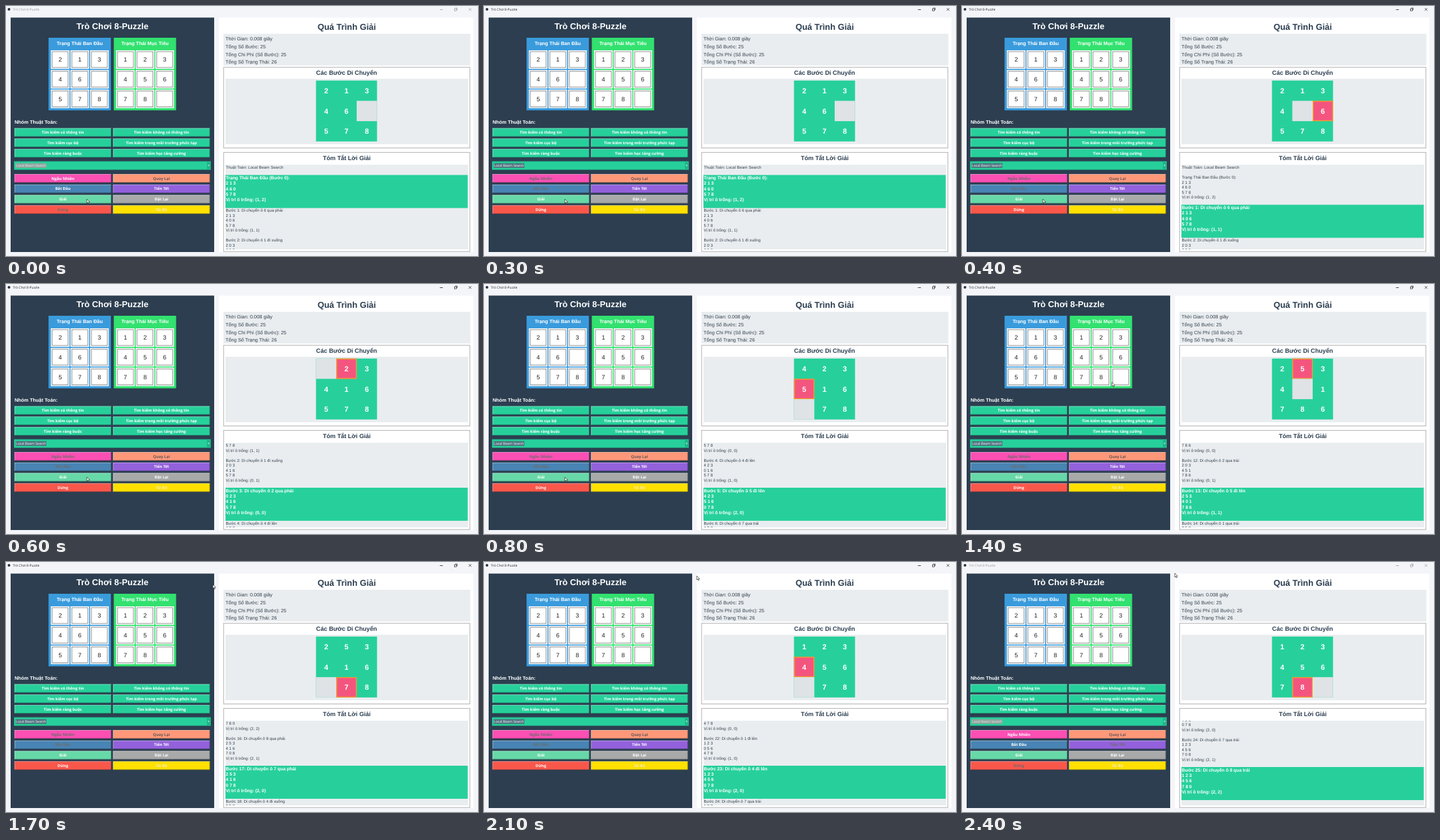
An HTML page with a canvas for the animation above (2.8 s loop, 712 by 378 pixels).

```html
<!DOCTYPE html>
<html lang="vi">
<head>
<meta charset="utf-8">
<title>Trò Chơi 8-Puzzle</title>
<style>
html, body { margin: 0; width: 712px; height: 378px; overflow: hidden; }
canvas { display: block; }
</style>
</head>
<body>
<canvas id="stage" width="712" height="378"></canvas>
<script>
const ctx = document.getElementById('stage').getContext('2d');
ctx.textRendering = 'geometricPrecision';
const ARIAL = '"Liberation Sans", Arial, sans-serif';
const UI = '"Open Sans", "Noto Sans", sans-serif';
const GREEN = '#27d09b', NAVY = '#2c3e50', GREY = '#e9edf0', OFF = '#6d6d6d';

const LOOP = 2800, TICK = 100;
const STEP_AT = [0, 0, 0, 0, 1, 2, 3, 4, 5, 6, 7, 9, 10, 11, 13, 14, 16, 17, 18, 20, 21, 23, 24, 25, 25];
const POINTER = [[0, 122, 292], [8, 122, 292], [12, 169, 225], [17, 312, 34], [21, 321, 21], [24, 321, 17]];

// Play the solution: each digit is the tile that slides into the gap.
const WAYS = { 1: 'qua phải', '-1': 'qua trái', 3: 'đi xuống', '-3': 'đi lên' };
const steps = [{ title: 'Trạng Thái Ban Đầu (Bước 0):', cells: [...'213460578'] }];
[...'6124578615425168741521478'].forEach((tile, i) => {
  const cells = [...steps[i].cells];
  const from = cells.indexOf(tile), to = cells.indexOf('0');
  cells[to] = tile;
  cells[from] = '0';
  steps.push({ title: `Bước ${i + 1}: Di chuyển ô ${tile} ${WAYS[to - from]}`, cells, moved: to });
});

function rect(x, y, w, h, fill) {
  ctx.fillStyle = fill;
  ctx.fillRect(x, y, w, h);
}

function frame(x, y, w, h, color, line = 1) {
  ctx.strokeStyle = color;
  ctx.lineWidth = line;
  ctx.strokeRect(x, y, w, h);
}

// y is the middle of the capital letters
function text(str, x, y, size, color, { bold = false, align = 'left', font = ARIAL } = {}) {
  ctx.font = `${bold ? 'bold ' : ''}${size}px ${font}`;
  ctx.textAlign = align;
  ctx.fillStyle = color;
  ctx.fillText(str, x, y + size * 0.36);
}

const heading = (str, x, y, size, color) => text(str, x, y, size, color, { bold: true, align: 'center' });

function path(points, close) {
  ctx.beginPath();
  points.forEach(([x, y]) => ctx.lineTo(x, y));
  if (close) ctx.closePath();
}

function titleBar(active) {
  const ink = active ? '#222' : '#999';
  ctx.fillStyle = '#26323f';
  ctx.beginPath();
  ctx.arc(4.5, 5, 2, 0, 7);
  ctx.fill();
  text('Trò Chơi 8-Puzzle', 10.5, 5.3, 5, ink, { font: UI });
  rect(654.5, 5, 4.5, 0.8, ink);
  frame(676.4, 4.2, 3, 3, ink, 0.7);
  ctx.lineWidth = 0.7;
  path([[677.4, 3], [680.6, 3], [680.6, 6.2]]);
  ctx.stroke();
  for (const d of [-2, 2]) {
    path([[700 - d, 3.2], [700 + d, 7.2]]);
    ctx.stroke();
  }
}

function smallBoard(x, color, title, cells) {
  rect(x, 48, 94, 109.7, color);
  heading(title, x + 47, 56, 7.4, '#fff');
  [...cells].forEach((n, i) => {
    const cx = x + 17.5 + i % 3 * 29.6, cy = 81 + Math.floor(i / 3) * 29.7;
    rect(cx - 14, cy - 14, 28, 28, '#fff');
    frame(cx - 12, cy - 12, 24, 24, '#777', 0.8);
    if (n !== '0') text(n, cx, cy, 9.2, '#222', { align: 'center' });
  });
}

function button(label, i, top, color, ink = '#fff') {
  const x = i % 2 ? 161.5 : 12.8, y = top + Math.floor(i / 2) * 15.75;
  rect(x, y, 146, 12.7, color);
  rect(x, y, 146, 0.7, '#ffffff80');
  rect(x, y, 0.7, 12.7, '#ffffff80');
  rect(x, y + 12, 146, 0.7, '#00000050');
  rect(x + 145.3, y, 0.7, 12.7, '#00000050');
  text(label, x + 73, y + 6.4, 5.85, ink, { bold: true, align: 'center', font: UI });
}

function leftPanel(active, ended) {
  rect(7, 17.5, 307, 354.5, NAVY);
  heading('Trò Chơi 8-Puzzle', 160.5, 30.5, 12.9, '#fff');
  smallBoard(64.2, '#3a9bdc', 'Trạng Thái Ban Đầu', '213460578');
  smallBoard(162.6, '#32e16f', 'Trạng Thái Mục Tiêu', '123456780');

  text('Nhóm Thuật Toán:', 13, 175, 7.4, '#fff', { bold: true });
  ['Tìm kiếm có thông tin', 'Tìm kiếm không có thông tin', 'Tìm kiếm cục bộ',
    'Tìm kiếm trong môi trường phức tạp', 'Tìm kiếm ràng buộc', 'Tìm kiếm học tăng cường']
    .forEach((label, i) => button(label, i, 184.7, GREEN));

  rect(12, 234.8, 297, 12.7, GREEN);
  frame(12.3, 235.1, 296.4, 12.1, '#1fa97e', 0.6);
  rect(14.5, 237.6, 46.5, 7.2, active ? '#4f7480' : '#8ba79f');
  text('Local Beam Search', 15, 241.2, 5.2, active ? '#fff' : '#f3e3e3', { font: UI });
  rect(303, 235.8, 5.2, 10.8, '#1fb588');
  ctx.fillStyle = '#fff';
  path([[304.2, 240.4], [307, 240.4], [305.6, 242]], true);
  ctx.fill();

  const whileIdle = active ? OFF : '#fff';
  [['Ngẫu Nhiên', '#fb4fb4', whileIdle], ['Quay Lại', '#ff9878', '#66595a'],
    ['Bắt Đầu', '#4884b4', whileIdle], ['Tiến Tới', '#9361dc', ended ? OFF : '#fff'],
    ['Giải', '#67d8a7'], ['Đặt Lại', '#a8a9a9'],
    ['Dừng', '#fa574b', active ? '#fff' : OFF], ['Tải Bộ', '#ffe000', '#f6eeb4']]
    .forEach(([label, color, ink], i) => button(label, i, 254.2, color, ink));
}

function mainBoard({ cells, moved }) {
  const size = 30.7;
  rect(467.6, 112.7, size * 3, size * 3, GREEN);
  cells.forEach((n, i) => {
    const x = 467.6 + i % 3 * size, y = 112.7 + Math.floor(i / 3) * size;
    if (n === '0') return rect(x, y, size, size, '#dfe3e6');
    if (i === moved) {
      rect(x, y, size, size, '#f4557f');
      frame(x + 0.6, y + 0.6, size - 1.2, size - 1.2, '#f5a623', 1.2);
    }
    heading(n, x + size / 2, y + size / 2, 11, '#fff');
  });
}

function log(now) {
  const line = 7.5, block = 6 * line, tall = 50;
  const top = now < 2 ? 255.5 + block * now : now < 25 ? 308 : 310;
  ctx.save();
  ctx.beginPath();
  ctx.rect(331, 240, 366, 128);
  ctx.clip();
  rect(331, 240, 366, 128, GREY);
  text('Thuật Toán: Local Beam Search', 331.5, top - block * now - 2 * line + 3.8, 6.1, '#34404c');
  steps.forEach(({ title, cells }, i) => {
    const on = i === now;
    const y = top + block * (i - now) + (i > now ? tall - block : 0);
    const gap = cells.indexOf('0');
    if (on) rect(331, y, 365.5, tall, GREEN);
    const rows = [0, 3, 6].map(r => cells.slice(r, r + 3).join(' '));
    [title, ...rows, `Vị trí ô trống: (${Math.floor(gap / 3)}, ${gap % 3})`].forEach((str, k) =>
      text(str, 331.5, y + (on ? 4.2 + k * tall / 6 : 3.8 + k * line),
        on ? 6.8 : 6.1, on ? '#fff' : '#34404c', { bold: on }));
  });
  ctx.restore();
}

function rightPanel(now) {
  rect(321, 17.5, 384, 354.5, '#fff');
  heading('Quá Trình Giải', 514, 31, 12.9, NAVY);
  rect(328, 42, 372.5, 48, GREY);
  ['Thời Gian: 0.008 giây', 'Tổng Số Bước: 25', 'Tổng Chi Phí (Số Bước): 25', 'Tổng Số Trạng Thái: 26']
    .forEach((str, i) => text(str, 331, [49.6, 61.8, 73, 84.4][i], 7.4, '#34404c'));

  frame(328.2, 92.7, 371.6, 122, '#aaa', 0.9);
  heading('Các Bước Di Chuyển', 513.7, 101, 9.15, NAVY);
  rect(331, 110, 366, 99, GREY);
  mainBoard(steps[now]);

  frame(328.2, 221.3, 371.6, 149.9, '#aaa', 0.9);
  heading('Tóm Tắt Lời Giải', 514, 230, 9.1, NAVY);
  log(now);
}

function pointer(tick) {
  const k = POINTER.findIndex(p => p[0] > tick);
  const [t0, x0, y0] = POINTER.at(k < 0 ? -1 : k - 1);
  const [t1, x1, y1] = POINTER.at(k);
  const f = k < 0 ? 0 : (tick - t0) / (t1 - t0);
  ctx.save();
  ctx.translate(x0 + (x1 - x0) * f, y0 + (y1 - y0) * f);
  path([[0, 0], [0, 6], [1.4, 4.8], [2.4, 7], [3.4, 6.5], [2.5, 4.4], [4.3, 4.3]], true);
  ctx.fillStyle = '#fff';
  ctx.fill();
  ctx.strokeStyle = '#111';
  ctx.lineWidth = 0.6;
  ctx.stroke();
  ctx.restore();
}

function draw() {
  const tick = Math.min(24, Math.floor(performance.now() % LOOP / TICK));
  const active = tick > 2 && tick < 24;
  rect(0, 0, 712, 378, '#f4f5f9');
  titleBar(active);
  leftPanel(active, tick === 24);
  rightPanel(STEP_AT[tick]);
  pointer(tick);
  requestAnimationFrame(draw);
}
draw();
</script>
</body>
</html>
```
